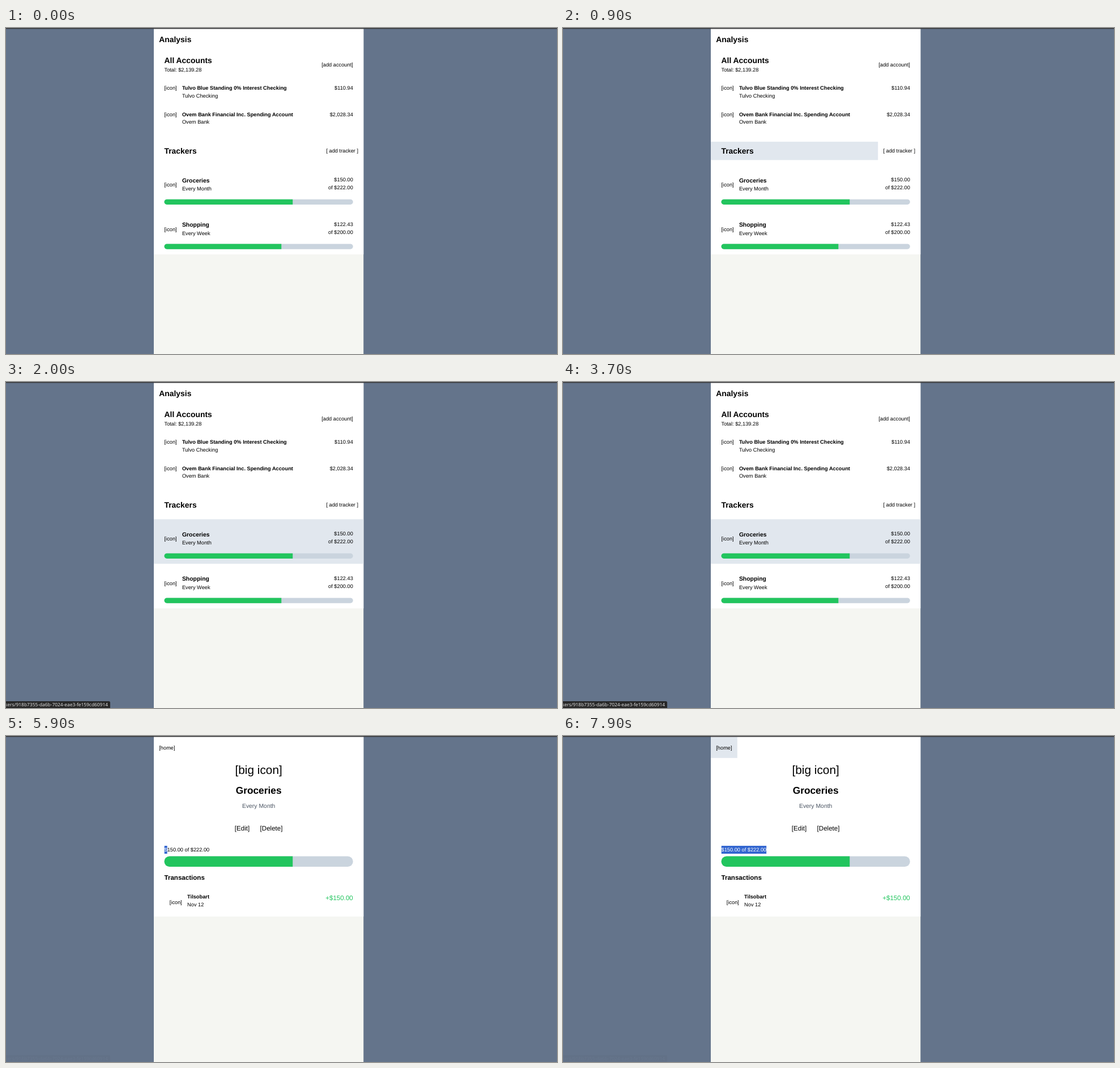
An HTML page for the animation above (8 s loop, 973 by 576 pixels).

```html
<!DOCTYPE html>
<html lang="en">
<head>
<meta charset="utf-8">
<title>Budget overview</title>
<style>
  html { font-size: 9.257px; }
  html, body { margin: 0; width: 973px; height: 576px; overflow: hidden; background: #64748b; }
  svg { display: block; }
  text {
    font-family: "Liberation Sans", Arial, sans-serif;
    font-size: 1rem;
    text-rendering: geometricPrecision;
    white-space: pre;
  }
  .b { font-weight: 700; }
  .lg { font-size: 1.125rem; }
  .xl { font-size: 1.25rem; }
  .x2 { font-size: 1.5rem; }
  .x3 { font-size: 1.875rem; }
  .x4 { font-size: 2.25rem; }
  .end { text-anchor: end; }
  .mid { text-anchor: middle; }
  .muted { fill: #4b5563; }
  .green { fill: #22c55e; }
  .track { fill: #cad4de; }
  .paper { fill: #fff; }
  .hover { fill: #e1e7ee; }
  .status rect { fill: #282828; }
  .status text { font: 8.4px "Noto Sans", "Open Sans", sans-serif; fill: #dcdcdc; text-anchor: end; }

  .anim { opacity: 0; animation: 8s step-end infinite; }
  #list { opacity: 1; animation-name: list; }
  #detail { animation-name: detail; }
  #account1 { animation-name: account1; }
  #account2 { animation-name: account2; }
  #trackers { animation-name: trackers; }
  #add { animation-name: add; }
  #groceries { animation-name: groceries; }
  #edit { animation-name: edit; }
  #home { animation-name: home; }
  #link1 { animation-name: link1; }
  #link2 { animation-name: link2; }
  #link3 { animation-name: link3; }
  #selection { clip-path: inset(0 100% 0 0); animation: select 8s step-end infinite; }

  @keyframes list { 48.75% { opacity: 0; } }
  @keyframes detail { 48.75% { opacity: 1; } }
  @keyframes account1 { 3.75% { opacity: 1; } 6.25% { opacity: 0; } }
  @keyframes account2 { 6.25% { opacity: 1; } 7.5% { opacity: 0; } }
  @keyframes trackers { 11.25% { opacity: 1; } 20% { opacity: 0; } }
  @keyframes add { 20% { opacity: 1; } 23.75% { opacity: 0; } }
  @keyframes groceries { 23.75% { opacity: 1; } 48.75% { opacity: 0; } }
  @keyframes edit { 95% { opacity: 1; } 96.25% { opacity: 0; } }
  @keyframes home { 98.75% { opacity: 1; } }
  @keyframes link1 { 16.25% { opacity: .5; } 17.5% { opacity: 1; } 21.25% { opacity: 0; } }
  @keyframes link2 { 21.25% { opacity: 1; } 25% { opacity: 0; } }
  @keyframes link3 { 25% { opacity: 1; } 52.5% { opacity: .5; } 53.75% { opacity: .03; } }
  @keyframes select {
    73.75% { clip-path: inset(0 93.5% 0 0); }
    75% { clip-path: inset(0 64.5% 0 0); }
    76.25% { clip-path: inset(0 29% 0 0); }
    77.5% { clip-path: inset(0 0 0 0); }
  }
</style>
</head>
<body>
<svg width="973" height="576" viewBox="0 0 973 576">
  <defs>
    <clipPath id="thin"><rect x="279.5" y="302.7" width="333.3" height="9.26" rx="4.63"/></clipPath>
    <clipPath id="thick"><rect x="279.5" y="212.5" width="333.3" height="18.5" rx="9.25"/></clipPath>
  </defs>
  <rect width="973" height="576" fill="#64748b"/>
  <rect x="261" width="370.3" height="576" fill="#f5f6f2"/>

  <g id="list" class="anim">
    <rect class="paper" x="261" width="370.3" height="400"/>
    <rect id="account1" class="anim hover" x="261" y="89.8" width="370.3" height="46.3"/>
    <rect id="account2" class="anim hover" x="261" y="136.1" width="370.3" height="46.3"/>
    <rect id="trackers" class="anim hover" x="261" y="200.9" width="295.2" height="32.4"/>
    <rect id="add" class="anim hover" x="556.2" y="200.9" width="75.1" height="32.4"/>
    <rect id="groceries" class="anim hover" x="261" y="242.5" width="370.3" height="78.7"/>

    <text class="b x2" x="270.3" y="25.2">Analysis</text>
    <text class="b x2" x="279.5" y="62.2">All Accounts</text>
    <text x="279.5" y="76.8">Total: $2,139.28</text>
    <text class="end" x="612.8" y="67.5">[add account]</text>

    <text x="279.5" y="109.2">[icon]</text>
    <text class="b" x="310.9" y="109.2">Tulvo Blue Standing 0% Interest Checking</text>
    <text x="310.9" y="123.1">Tulvo Checking</text>
    <text class="end" x="612.8" y="109.2">$110.94</text>

    <text x="279.5" y="155.5">[icon]</text>
    <text class="b" x="310.9" y="155.5">Ovem Bank Financial Inc. Spending Account</text>
    <text x="310.9" y="169.4">Ovem Bank</text>
    <text class="end" x="612.8" y="155.5">$2,028.34</text>

    <text class="b x2" x="279.5" y="221.8">Trackers</text>
    <text class="end" x="622" y="220.3">[ add tracker ]</text>

    <g>
      <text x="279.5" y="280.4">[icon]</text>
      <text class="b lg" x="310.9" y="272.8">Groceries</text>
      <text x="310.9" y="287.4">Every Month</text>
      <text class="end" x="612.8" y="271.2">$150.00</text>
      <text class="end" x="612.8" y="285.1">of $222.00</text>
      <g clip-path="url(#thin)">
        <rect class="track" x="279" y="302" width="335" height="11"/>
        <rect class="green" x="279" y="302" width="227.3" height="11"/>
      </g>
    </g>
    <g transform="translate(0 78.7)">
      <text x="279.5" y="280.4">[icon]</text>
      <text class="b lg" x="310.9" y="272.8">Shopping</text>
      <text x="310.9" y="287.4">Every Week</text>
      <text class="end" x="612.8" y="271.2">$122.43</text>
      <text class="end" x="612.8" y="285.1">of $200.00</text>
      <g clip-path="url(#thin)">
        <rect class="track" x="279" y="302" width="335" height="11"/>
        <rect class="green" x="279" y="302" width="207.3" height="11"/>
      </g>
    </g>
  </g>

  <g id="detail" class="anim">
    <rect class="paper" x="261" width="370.3" height="319"/>
    <rect id="home" class="anim hover" x="261" y="1.8" width="46.8" height="37"/>
    <rect id="edit" class="anim hover" x="394.6" y="145.6" width="44.8" height="34.7"/>

    <text x="270.3" y="23.6">[home]</text>
    <text class="mid x4" x="446.15" y="66.8">[big icon]</text>
    <text class="mid b x3" x="446.15" y="101.6">Groceries</text>
    <text class="mid lg muted" x="446.15" y="127">Every Month</text>
    <text class="xl" x="403.8" y="167">[Edit]</text>
    <text class="xl" x="448.6" y="167">[Delete]</text>

    <text x="279.5" y="204.2">$150.00 of $222.00</text>
    <g id="selection">
      <rect x="279.5" y="194" width="79.9" height="14" fill="#3366d0"/>
      <text x="279.5" y="204.2" fill="#fff">$150.00 of $222.00</text>
    </g>
    <g clip-path="url(#thick)">
      <rect class="track" x="279" y="212" width="335" height="20"/>
      <rect class="green" x="279" y="212" width="227.3" height="20"/>
    </g>

    <text class="b xl" x="279.5" y="253.7">Transactions</text>
    <text x="288.8" y="296.7">[icon]</text>
    <text class="b" x="320.1" y="287.4">Tilsobart</text>
    <text x="320.1" y="301.3">Nov 12</text>
    <text class="end xl green" x="612.8" y="289.5">+$150.00</text>
  </g>

  <rect width="973" height="1.6" fill="#3a3a3c"/>

  <g id="link1" class="anim status">
    <rect x="-5" y="564" width="22" height="17" rx="2.5"/>
    <text x="13" y="573.3">kers</text>
  </g>
  <g id="link2" class="anim status">
    <rect x="-5" y="564" width="42" height="17" rx="2.5"/>
    <text x="33" y="573.3">kers/new</text>
  </g>
  <g id="link3" class="anim status">
    <rect x="-5" y="564" width="189" height="17" rx="2.5"/>
    <text x="180" y="573.3">kers/918b7355-da6b-7024-eae3-fe159cd60914</text>
  </g>
</svg>
</body>
</html>
```
